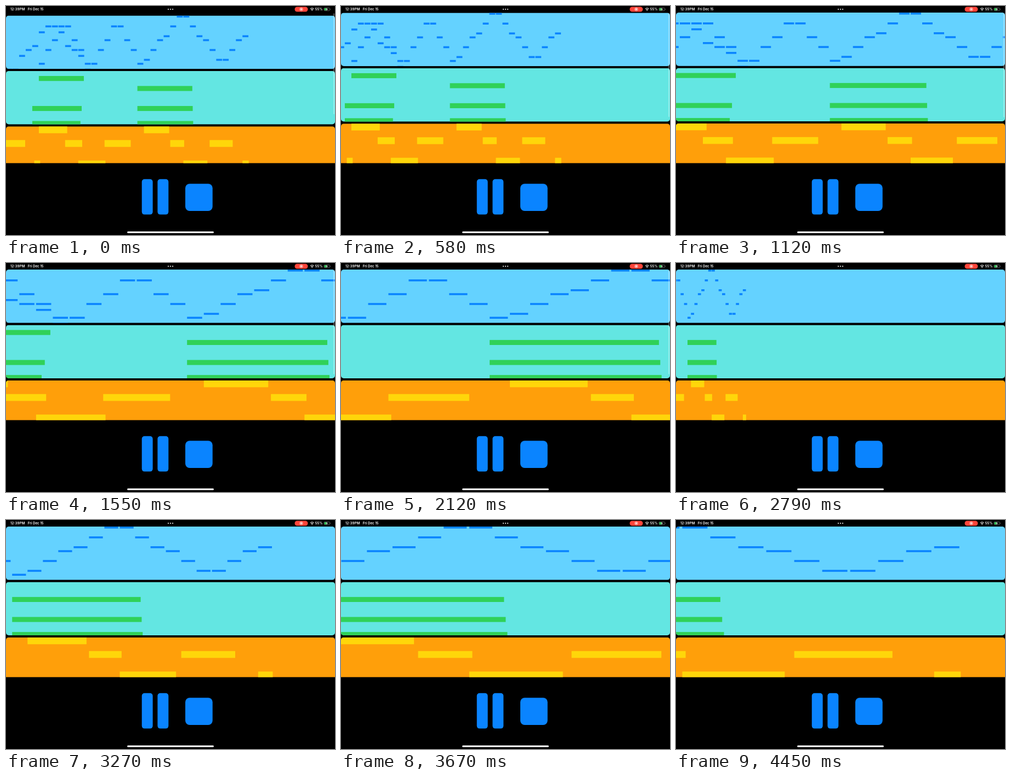
Write an HTML page that moves like this. It is 600x419 px and loops after 4480 ms.

```html
<!DOCTYPE html>
<html lang="en">
<head>
<meta charset="utf-8">
<title>Piano roll</title>
<style>
  html, body { margin: 0; height: 100%; overflow: hidden; background: #000; }
  svg { display: block; }
  text { font: 600 6.2px Inter, sans-serif; fill: #fff; }
</style>
</head>
<body>
<svg width="600" height="419" viewBox="0 0 600 419">
  <defs>
    <clipPath id="viewport"><rect width="600" height="287.6"/></clipPath>
    <clipPath id="card"><rect width="600" height="97.6" rx="5"/></clipPath>
  </defs>

  <g clip-path="url(#viewport)">
    <g id="scroller"></g>
    <rect id="thumb" x="597.2" y="13.5" width="1.6" rx=".8" fill="#fff"/>
  </g>

  <text x="8" y="8.2">12:39&#8202;PM</text>
  <text x="39.8" y="8.2">Fri Dec 15</text>
  <g fill="#bbb">
    <circle cx="296" cy="6" r="1.2"/><circle cx="300" cy="6" r="1.2"/><circle cx="304" cy="6" r="1.2"/>
  </g>
  <rect x="526.5" y="1.5" width="24" height="9" rx="4.5" fill="#ff453a"/>
  <circle cx="538.5" cy="6" r="2.7" fill="none" stroke="#fff" stroke-width=".7"/>
  <circle cx="538.5" cy="6" r="1.4" fill="#fff"/>
  <path d="M554.9 5.2a4.6 4.6 0 0 1 6.6 0M556.2 6.9a2.8 2.8 0 0 1 4 0" fill="none" stroke="#fff" stroke-width="1.1"/>
  <path d="M557.1 7.8a1.6 1.6 0 0 1 2.2 0l-1.1 1.2z" fill="#fff"/>
  <text x="563.8" y="8.2">55%</text>
  <rect x="579.8" y="3.3" width="10.6" height="5.4" rx="1.6" fill="none" stroke="#888" stroke-width=".6"/>
  <rect x="580.6" y="4.1" width="5" height="3.8" rx=".9" fill="#30d158"/>
  <path d="M591.1 5v2q.8-.3.8-1t-.8-1z" fill="#888"/>
  <path d="M586 2.6l-2.8 3.8h1.7l-.6 3 2.8-3.9h-1.8z" fill="#fff" stroke="#000" stroke-width=".3"/>

  <g fill="#0a84ff">
    <rect x="247.7" y="316.8" width="19.9" height="64.8" rx="5"/>
    <rect x="276.4" y="316.8" width="19.9" height="64.8" rx="5"/>
    <rect x="327" y="325.2" width="49.7" height="49.8" rx="8"/>
  </g>
  <rect x="221" y="412.4" width="158" height="3" rx="1.5" fill="#fff"/>
</svg>

<script>
const LOOP = 4480, STEPS = 148;
const scroller = document.getElementById('scroller');
const thumb = document.getElementById('thumb');

// Every note is [row from the top, start beat, length in beats]

// Runs down and up the rungs of a chord, repeating each end; starts down at beat `turn`
function arpeggio(rungs, from, to, turn) {
  const n = rungs.length, notes = [];
  for (let beat = from; beat <= to; beat++) {
    const k = (beat - turn + 2 * n) % (2 * n);
    notes.push([rungs[k < n ? n - 1 - k : k - n], beat, 0.9]);
  }
  return notes;
}

// Held notes whose releases are spread out by `drift`
const hold = (rows, start, length, drift = 0) =>
  rows.map((row, i) => [row, start, length + i * drift]);

// Four-note bass phrase, played more or less legato
const phrase = (start, legato) => [
  [0, start, 4.08 + legato], [2, start + 4, 2.36 + legato],
  [5, start + 6, 3.9 + legato], [2, start + 10, 3.75 + legato]
];

const melody = [
  ...arpeggio([5, 8, 15, 17, 20, 27], 0, 12, 1),
  ...arpeggio([5, 12, 17, 24], 5, 20, 5),
  ...arpeggio([0, 5, 10, 12, 17, 22], 21, 36, 21)
];
const chords = [
  ...hold([1], 5, 6.85), ...hold([7, 10], 4, 7.52, -0.19), ...hold([3, 7, 10], 20, 8.36, 0.065)
];
const bass = [
  ...hold([2], 0, 2.92), ...hold([5], 4.3, 0.9), ...phrase(5, 0.24), ...phrase(21, -0.24), ...hold([5], 36, 0.95)
];
const tracks = [
  { row: 3.6, back: '#64d2ff', ink: '#0a84ff', notes: melody },
  { row: 9.15, back: '#63e6e2', ink: '#30d158', notes: chords },
  { row: 12.5, back: '#ff9f0a', ink: '#ffd60a', notes: bass }
];

scroller.innerHTML = tracks.map(({ row, back, ink, notes }, i) => `
  <g transform="translate(0 ${12 + i * 101.4})"><g clip-path="url(#card)">
    <rect width="600" height="98" fill="${back}"/>
    <g class="notes" fill="${ink}">${notes.map(([r, start, length]) =>
      `<rect x="${start}" y="${r * row}" width="${length}" height="${row}"/>`).join('')}</g>
  </g></g>`).join('');
const layers = scroller.querySelectorAll('.notes');

// Pinch gestures: [time, pixels per beat]
const pinch = [[0, 11.98], [580, 11.98], [1550, 30.68], [2120, 36.93], [2790, 6.3], [3670, 46.73], [LOOP, 51.2]];

// Monotone cubic through the keys
function curve(keys, t) {
  const last = keys.length - 2;
  const slope = i => (keys[i + 1][1] - keys[i][1]) / (keys[i + 1][0] - keys[i][0]);
  const tangent = i => {
    const a = slope(Math.max(i - 1, 0)), b = slope(Math.min(i, last));
    return a * b > 0 ? 2 * a * b / (a + b) : 0;
  };
  let i = 0;
  while (i < last && t >= keys[i + 1][0]) i++;
  const [[t0, a], [t1, b]] = keys.slice(i);
  const span = t1 - t0, u = (t - t0) / span, v = 1 - u;
  return v * v * (1 + 2 * u) * a + u * u * (3 - 2 * u) * b
    + span * u * v * (v * tangent(i) - u * tangent(i + 1));
}

// Beats played; the tempo quickens slightly
const playhead = seconds => 5.935 * seconds + 0.0185 * seconds ** 2;

function draw(now) {
  const step = Math.floor((now % LOOP + 1) * STEPS / LOOP) % STEPS;
  const t = step * LOOP / STEPS;
  const zoom = curve(pinch, t), shift = -playhead(t / 1000) * zoom;
  const bounce = 5.5 * Math.exp(-t / 220);
  layers.forEach(layer => layer.setAttribute('transform', `translate(${shift} 0) scale(${zoom} 1)`));
  scroller.setAttribute('transform', `translate(0 ${bounce})`);
  thumb.setAttribute('height', 190 - bounce);
  thumb.setAttribute('opacity', 0.4 * Math.min(1, Math.max(0, (2500 - t) / 300)));
}

let start;
function tick(now) {
  start ??= now;
  draw(now - start);
  requestAnimationFrame(tick);
}
draw(0);
requestAnimationFrame(tick);
</script>
</body>
</html>
```
